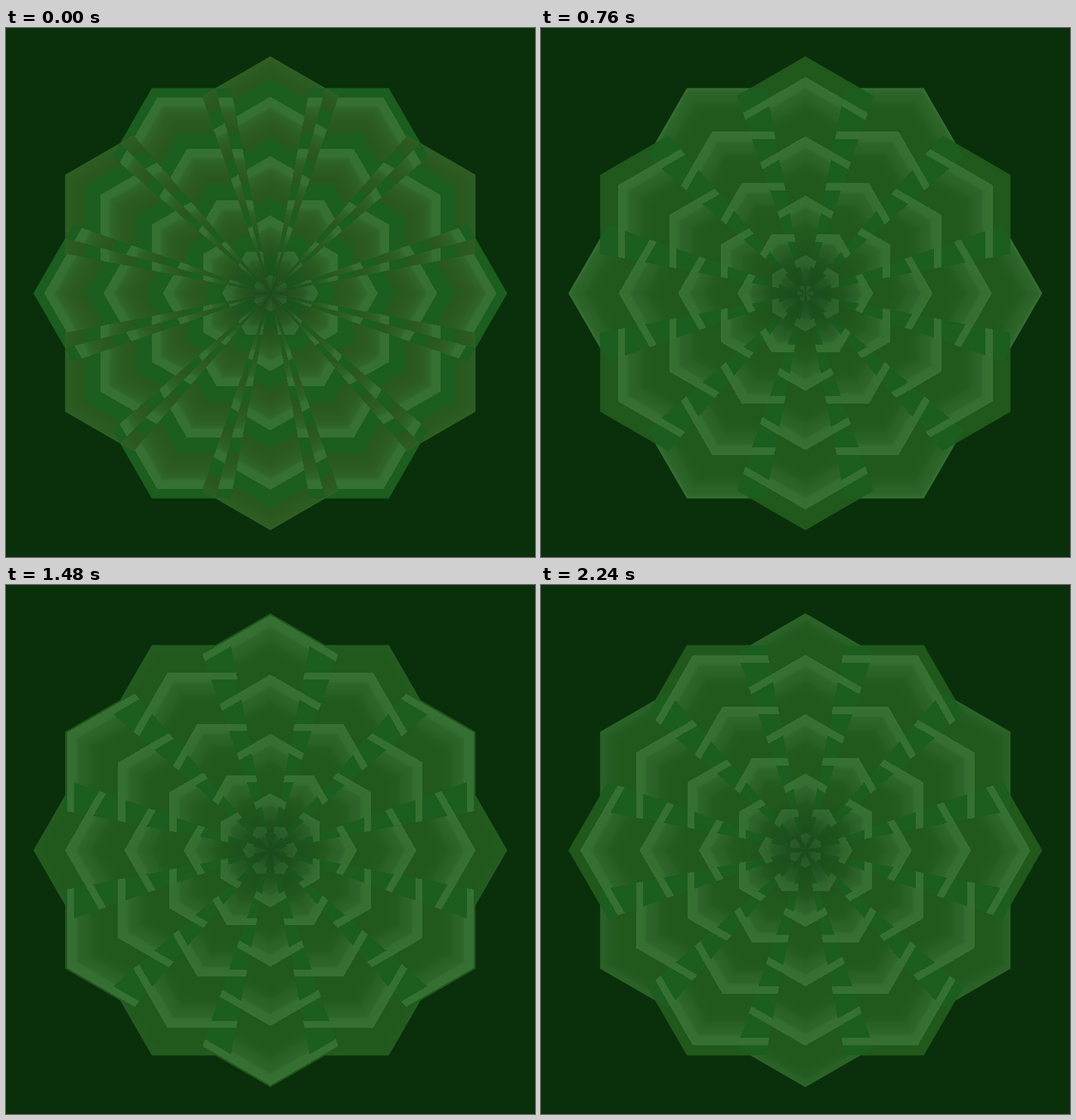
Animation of 700 by 700 pixels, one loop 2280 ms. Source, as an HTML page with a canvas:

```html
<!DOCTYPE html>
<html lang="en">
<head>
<meta charset="utf-8">
<title>Green rosette</title>
<style>
html, body { margin: 0; width: 100%; height: 100%; overflow: hidden; background: #0a300b; }
canvas { display: block; }
</style>
</head>
<body>
<canvas id="stage" width="700" height="700"></canvas>
<script>
const SIZE = 700, CX = 349.8, CY = 351, R = 313.5;
const LOOP = 2280, STEP = 40, PERIOD = 78.5, START = 260;
const C30 = Math.cos(Math.PI / 6), SECTOR = Math.PI / 3;
const ARM = Math.atan(1 / (6 * C30)); // where an arm of a third of a side ends
const BG = [10, 48, 11], GREEN = [27, 94, 31], LIGHT = [54, 112, 51], CORE = [22, 62, 24];
const N = 512;

const ctx = document.getElementById('stage').getContext('2d');
const image = ctx.createImageData(SIZE, SIZE);
const data = image.data;
const clamp = v => Math.max(0, Math.min(1, v));
const mix = (a, b, k) => a.map((v, i) => v + (b[i] - v) * k);
const wrap = v => v - Math.floor(v);

// Hexagon radii of both families for every pixel inside the rosette
const cells = [];
for (let y = 0; y < SIZE; y++) {
  for (let x = 0; x < SIZE; x++) {
    const dx = x + 0.5 - CX, dy = y + 0.5 - CY;
    const d = Math.hypot(dx, dy);
    const p = (y * SIZE + x) * 4;
    data.set([...BG, 255], p);
    if (d > R + 2) continue;
    let a = Math.atan2(dx, -dy);
    a = Math.abs(a - Math.round(a / SECTOR) * SECTOR);
    const ra = d * Math.cos(SECTOR / 2 - a) / C30;
    const rb = d * Math.cos(a) / C30;
    const cover = clamp(R + 0.5 - Math.min(ra, rb));
    if (!cover) continue;
    let zone = a < ARM ? 0 : a > SECTOR / 2 - ARM ? 1 : 2;
    if (zone === 2 && Math.max(ra, rb) > R) zone = ra < rb ? 0 : 1;
    cells.push({ p, ra, rb, zone, cover, core: 0.55 * clamp(1 - d / 75) });
  }
}

function ramp(stops, f) {
  let i = 1;
  while (i < stops.length - 1 && stops[i][0] < f) i++;
  const [f0, c0] = stops[i - 1], [f1, c1] = stops[i];
  return mix(c0, c1, clamp((f - f0) / (f1 - f0)));
}

const early = [[0, LIGHT], [0.15, LIGHT], [0.21, [47, 102, 41]], [0.36, [45, 93, 34]], [0.62, [40, 88, 30]], [1, [36, 87, 29]]];
const late = [[0, LIGHT], [0.17, [52, 110, 49]], [0.22, [45, 101, 42]], [0.4, [41, 96, 38]], [0.48, [35, 91, 32]], [0.7, [33, 88, 28]], [1, [33, 88, 28]]];

function petalColors(t) {
  const age = clamp(t / 760), band = 0.31 * (1 - age);
  return Array.from({ length: N }, (_, i) => {
    const f = i / N;
    const base = mix(ramp(early, f), ramp(late, f), age);
    return mix(base, GREEN, clamp((f - 1 + band) / 0.02));
  });
}

function draw(t) {
  const front = START + PERIOD * t / LOOP;
  const petal = petalColors(t);
  for (const c of cells) {
    const fa = wrap((front - c.ra) / PERIOD);
    const fb = wrap((front - c.rb) / PERIOD + 0.5);
    let color;
    if (c.zone === 0) color = petal[fa * N | 0];
    else if (c.zone === 1) color = petal[fb * N | 0];
    else if (t < 200) color = petal[(c.ra > c.rb ? fa : fb) * N | 0];
    else color = fa < 0.14 || fb < 0.14 ? LIGHT : GREEN;
    for (let i = 0; i < 3; i++) {
      const v = color[i] + (CORE[i] - color[i]) * c.core;
      data[c.p + i] = BG[i] + (v - BG[i]) * c.cover;
    }
  }
  ctx.putImageData(image, 0, 0);
}

const begin = performance.now();
let shown = -1;
function tick() {
  const t = Math.floor((performance.now() - begin) % LOOP / STEP) * STEP;
  if (t !== shown) draw(shown = t);
  requestAnimationFrame(tick);
}
draw(0);
requestAnimationFrame(tick);
</script>
</body>
</html>
```
